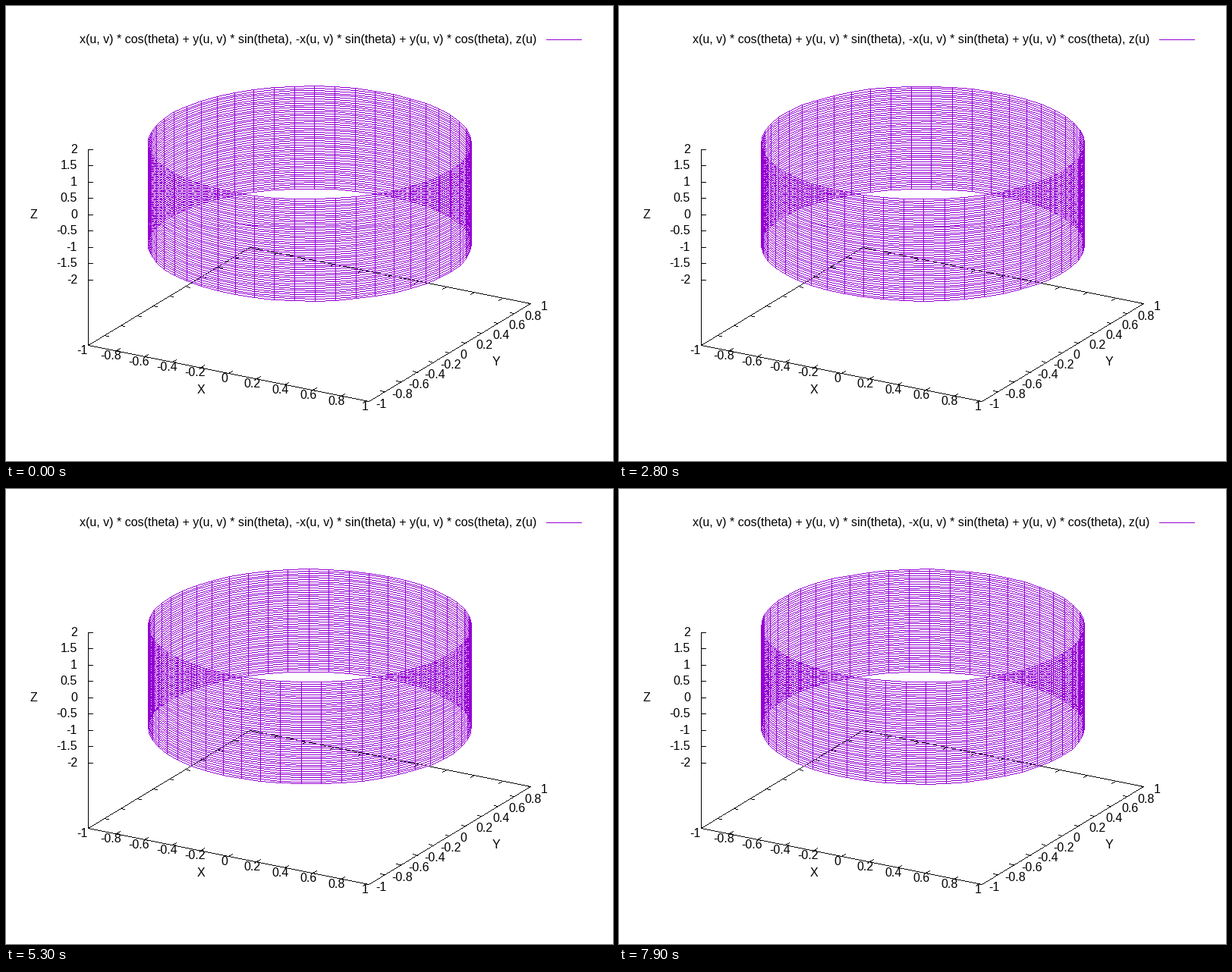
These frames come from a looping animation (800 px wide and 600 px high, 8 s). A matplotlib script:

```python
import numpy as np
import matplotlib.pyplot as plt
from matplotlib.animation import FuncAnimation

W, H, DPI = 800, 600, 100
FRAMES, INTERVAL = 80, 100
PURPLE, BLACK = (148, 0, 211), (0, 0, 0)
FLOOR, TOP = -4, 2                 # z of the base plane and of the axis top
SAMPLES = 50
MID = np.array([400, 290])         # stage point of the plot box centre
COS, SIN = np.cos(np.pi / 6), np.sin(np.pi / 6)

plt.rcParams["font.family"] = "Liberation Sans"
plt.rcParams["font.size"] = 16 * 72 / DPI

fig = plt.figure(figsize=(W / DPI, H / DPI), dpi=DPI, facecolor="white")
ax = fig.add_axes([0, 0, 1, 1])
ax.set(xlim=(0, W), ylim=(H, 0))
ax.axis("off")


def project(x, y, z):
    """Map plot coordinates to pixel offsets from the box centre."""
    px = 213.5 * (x * COS + y * SIN)
    py = 74.5 * (x * SIN - y * COS) - 43.01 * (z + 1)
    return np.stack(np.broadcast_arrays(px, py), axis=-1)


def draw_lines(img, points, color):
    """Draw one-pixel Bresenham polylines, points shaped (..., n, 2)."""
    a = points[..., :-1, :].reshape(-1, 2)
    b = points[..., 1:, :].reshape(-1, 2)
    steep = np.abs(b - a)[:, 1] > np.abs(b - a)[:, 0]
    # first column becomes the major axis, always walked upward
    a = np.where(steep[:, None], a[:, ::-1], a)
    b = np.where(steep[:, None], b[:, ::-1], b)
    swap = (a[:, 0] > b[:, 0])[:, None]
    a, b = np.where(swap, b, a), np.where(swap, a, b)

    length, rise = (b - a).T
    count = length + 1
    seg = np.repeat(np.arange(len(a)), count)
    i = np.arange(count.sum()) - np.repeat(np.cumsum(count) - count, count)
    n = np.maximum(length, 1)[seg]
    major = a[seg, 0] + i
    minor = a[seg, 1] + np.sign(rise)[seg] * (
        (2 * np.abs(rise)[seg] * i + n) // (2 * n))
    x = np.where(steep[seg], minor, major)
    y = np.where(steep[seg], major, minor)
    img[y, x] = color


def label(x, y, text, ha="center"):
    ax.text(x, y, text, ha=ha, va="baseline", color="black", zorder=3)


def draw_axes(img):
    def at(x, y, z=FLOOR):
        return MID + project(x, y, z)

    def line(*pts):
        pts = np.array(pts)
        cells = np.stack([np.floor(pts[:, 0]), np.ceil(pts[:, 1])], axis=-1)
        draw_lines(img, cells.astype(int), BLACK)

    def tick(start, toward, length=6):
        step = toward - start
        line(start, start + length * step / np.hypot(*step))

    line(at(-1, -1), at(1, -1), at(1, 1), at(-1, 1), at(-1, -1))
    line(at(-1, -1), at(-1, -1, TOP))

    for v in np.linspace(-1, 1, 11).round(1):
        text = f"{v + 0:g}"
        pad = 0 if v < 0 else 4.4  # blank in place of the sign

        front, back = at(v, -1), at(v, 1)
        tick(front, back)
        tick(back, front)
        label(front[0] - 7.5 + pad / 2, front[1] + 12.4, text)

        right, left = at(1, v), at(-1, v)
        tick(right, left)
        tick(left, right)
        label(right[0] + 9 + pad, right[1] + 8.9, text, "left")

    for z in np.arange(-2, 2.5, 0.5):
        p = at(-1, -1, z)
        tick(p, p + [1, 0])
        label(94, p[1] + 5.3, f"{z:g}", "right")

    label(256.5, 511, "X")
    label(645.5, 474, "Y")
    label(36.5, 280, "Z")


def draw_key(img):
    label(699, 49, "x(u, v) * cos(theta) + y(u, v) * sin(theta), "
          "-x(u, v) * sin(theta) + y(u, v) * cos(theta), z(u)", "right")
    draw_lines(img, np.array([(712, 44), (758, 44)]), PURPLE)


u = np.linspace(-np.pi / 2, np.pi / 2, SAMPLES)
v = np.linspace(0, 2 * np.pi, SAMPLES)


def draw_mesh(img, theta):
    x, y = np.cos(v - theta), np.sin(v - theta)
    grid = MID + np.trunc(project(x, y, u[:, None])).astype(int)
    posts = grid[[0, -1]].swapaxes(0, 1)
    draw_lines(img, grid, PURPLE)
    draw_lines(img, posts, PURPLE)


base = np.full((H, W, 3), 255, np.uint8)
draw_axes(base)
draw_key(base)
picture = ax.imshow(base, extent=(0, W, H, 0), aspect="auto",
                    interpolation="nearest", zorder=1)


def update(i):
    img = base.copy()
    draw_mesh(img, (i + 1) % 10 * np.pi / 5)
    picture.set_data(img)
    return [picture]


anim = FuncAnimation(fig, update, frames=FRAMES, interval=INTERVAL,
                     repeat=True, repeat_delay=0, blit=False)
plt.show()
```
